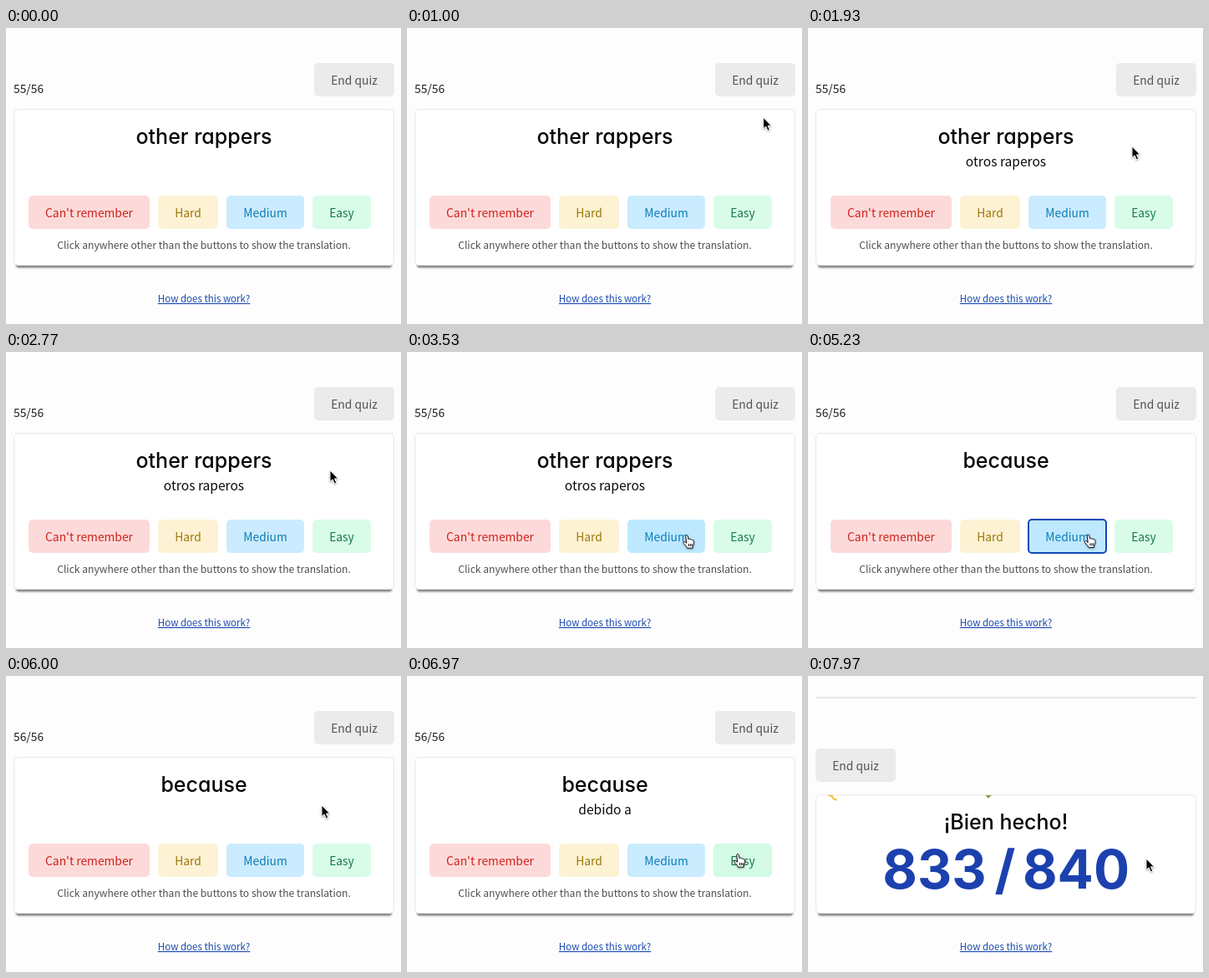
An HTML page that plays this animation: 473x355 px, repeating every 8000 ms.

```html
<!DOCTYPE html>
<html lang="en">
<head>
<meta charset="utf-8">
<title>Vocabulary quiz</title>
<style>
  html, body { margin: 0; width: 100%; height: 100%; overflow: hidden; background: #fdfdfd; }
  svg { display: block; width: 100%; height: 100%; }
  text {
    font-family: "Noto Sans CJK JP", "Noto Sans CJK SC", "Noto Sans CJK KR", "Noto Sans CJK", "Noto Sans", sans-serif;
    font-weight: 300;
    font-optical-sizing: none;
    white-space: pre;
  }
  .mid { text-anchor: middle; }
  .title { font: 500 25px Inter, sans-serif; font-feature-settings: "cv11"; fill: #060606; }
  .score { font: 700 64px Inter, sans-serif; fill: #1c41ae; }
  .body { font-size: calc(16px * var(--fit)); }
  .answer { font-size: calc(18px * var(--fit)); fill: #0a0a0a; }
  .hint { font-size: calc(14px * var(--fit)); fill: #4d4d4d; }
  .link { font-size: calc(13.33px * var(--fit)); fill: #1d4bb0; text-decoration: underline; }
  #cursor { filter: drop-shadow(0 1px 1px rgba(0, 0, 0, .35)); }
</style>
</head>
<body>
<svg viewBox="0 0 473 355" xmlns="http://www.w3.org/2000/svg">
  <defs>
    <filter id="soft" x="-5%" y="-200%" width="110%" height="500%"><feGaussianBlur stdDeviation="1.3"/></filter>
    <clipPath id="inside"><rect x="10" y="143" width="454" height="142" rx="5"/></clipPath>
  </defs>
  <rect width="473" height="355" fill="#fdfdfd"/>
  <rect id="rule" x="9" y="25" width="456" height="2" fill="#e6e6e6"/>
  <g id="end">
    <rect x="369" y="42" width="96" height="40" rx="5" fill="#ebebeb"/>
    <text class="body mid" x="417" y="68" fill="#525252">End quiz</text>
  </g>
  <rect x="12" y="282" width="450" height="5.5" rx="3" fill="#000" opacity=".5" filter="url(#soft)"/>
  <rect id="card" x="9.5" width="455" rx="5" fill="#fff" stroke="#e7e7e7"/>
  <g id="quiz">
    <text id="count" class="body" x="9" y="78" fill="#1c1c1c"></text>
    <text id="word" class="title mid" x="237" y="139"></text>
    <text id="answer" class="answer mid" x="237" y="166"></text>
    <g id="buttons"></g>
    <rect id="ring" x="264" y="201" width="93" height="40" rx="4" fill="none" stroke="#1249b5" stroke-width="2"/>
    <text class="hint mid" x="237" y="265">Click anywhere other than the buttons to show the translation.</text>
  </g>
  <g id="done">
    <g id="confetti" clip-path="url(#inside)"></g>
    <text class="title mid" x="237" y="184">¡Bien hecho!</text>
    <text class="score mid" x="151.5" y="255">833</text>
    <text class="score mid" x="236" y="255">/</text>
    <text class="score mid" x="321" y="255">840</text>
  </g>
  <text class="link mid" x="237" y="329">How does this work?</text>
  <g id="cursor">
    <path id="arrow" d="M0 0V13.6L3.1 10.8 5.4 16 7.8 15 5.5 9.9H9.7Z" fill="#000" stroke="#fff" stroke-width="1" stroke-linejoin="round"/>
    <path id="hand" d="M-1.3 .6C-1.1-.7 .9-.8 1.2 .6L2 4.6C2.7 3.8 4 4 4.3 5 5 4.3 6.3 4.6 6.5 5.6 7.4 5.1 8.5 5.6 8.6 6.8 8.8 9 8.5 10.8 7.3 12.8L7.2 15.2H.6C-.2 13-2.2 11.4-3.9 9.2-4.9 7.8-3.2 6.8-2 7.8L-.2 9.3ZM2.4 10V13M4.4 10V13M6.2 10V13" fill="#fff" stroke="#111" stroke-width="1" stroke-linejoin="round"/>
  </g>
</svg>
<script>
const LOOP = 8000;
const REVEAL = [1450, 6080];
const PRESS = 3800, NEXT = 3900, BLUR = 5900, DONE = 7250;

const $ = id => document.getElementById(id);
const show = (id, on) => $(id).setAttribute("display", on ? "inline" : "none");
const setText = (id, s) => { if ($(id).textContent !== s) $(id).textContent = s; };

function add(parent, tag, attrs, text = "") {
  const el = document.createElementNS("http://www.w3.org/2000/svg", tag);
  for (const k in attrs) el.setAttribute(k, attrs[k]);
  el.textContent = text;
  return parent.appendChild(el);
}

// Slightly smaller type when the light weight is not installed.
function fitType() {
  const ctx = document.createElement("canvas").getContext("2d");
  const width = weight => {
    ctx.font = weight + ' 100px "Noto Sans CJK JP", "Noto Sans", sans-serif';
    return ctx.measureText("remember").width;
  };
  const fit = Math.abs(width(300) - width(400)) > 1 ? 0.8955 : 0.865;
  document.documentElement.style.setProperty("--fit", fit);
}

const buttons = [
  { label: "Can't remember", x: 27, w: 145, bg: "#fddada", hover: "#fccccc", ink: "#cf2018" },
  { label: "Hard", x: 182, w: 72, bg: "#fdf2d3", hover: "#fcecc0", ink: "#9c760a" },
  { label: "Medium", x: 264, w: 93, bg: "#cbebff", hover: "#bee8ff", ink: "#087cb8" },
  { label: "Easy", x: 367, w: 70, bg: "#d9fce9", hover: "#d3fbe5", ink: "#157a42" }
];
for (const b of buttons) {
  b.rect = add($("buttons"), "rect", { x: b.x, y: 201, width: b.w, height: 40, rx: 5, fill: b.bg });
  add($("buttons"), "text", { class: "body mid", x: b.x + b.w / 2, y: 227, fill: b.ink }, b.label);
}

const bits = [
  { x: 30, born: 7780, color: "#f2c230", turn: 18, shape: "M-6-2Q-2-3 0-.5T6 0L5 3Q1 3.5-1 1.5T-6 1Z" },
  { x: 216, born: 7850, color: "#8b9c45", turn: 50, shape: "M-3.5-3.5H3.5V3.5H-3.5Z" }
];
for (const b of bits) b.el = add($("confetti"), "path", { d: b.shape, fill: b.color });

// Pointer stops: time, x, y
const stops = [
  [420, 446, 84], [800, 428, 106], [970, 428, 106], [1250, 388, 142],
  [2900, 388, 142], [3350, 335, 220], [5200, 335, 220], [5700, 378, 155],
  [6700, 378, 155], [6940, 396, 214], [7350, 396, 214], [7650, 405, 219]
];

function pointerAt(t) {
  const i = stops.findIndex(s => s[0] > t);
  if (i < 0) return stops[stops.length - 1].slice(1);
  if (i === 0) return stops[0].slice(1);
  const [t0, x0, y0] = stops[i - 1], [t1, x1, y1] = stops[i];
  const p = (t - t0) / (t1 - t0), e = p * p * (3 - 2 * p);
  return [x0 + (x1 - x0) * e, y0 + (y1 - y0) * e];
}

function draw(t) {
  const done = t >= DONE, second = t >= NEXT;
  const [px, py] = pointerAt(t), visible = t >= stops[0][0];

  show("quiz", !done);
  show("done", done);
  show("rule", done);
  $("end").setAttribute("transform", done ? "translate(-360 45)" : "");
  const top = done ? 142.5 : 97.5;
  $("card").setAttribute("y", top);
  $("card").setAttribute("height", 284.5 - top);

  setText("count", second ? "56/56" : "55/56");
  setText("word", second ? "because" : "other rappers");
  setText("answer", second ? "debido a" : "otros raperos");
  show("answer", t >= REVEAL[+second]);
  show("ring", t >= PRESS && t < BLUR);

  let over = false;
  for (const b of buttons) {
    const hit = visible && !done && px >= b.x && px <= b.x + b.w && py >= 201 && py <= 241;
    b.rect.setAttribute("fill", hit ? b.hover : b.bg);
    over = over || hit;
  }
  show("cursor", visible);
  show("hand", over);
  show("arrow", !over);
  $("cursor").setAttribute("transform", `translate(${px} ${py})`);

  for (const b of bits) {
    const age = Math.max(0, t - b.born) / 1000;
    const y = 137 + 32 * age + 60 * age * age;
    b.el.setAttribute("transform", `translate(${b.x} ${y}) rotate(${b.turn + 60 * (age - 0.15)})`);
  }
}

fitType();
const start = performance.now();
function tick() {
  draw((performance.now() - start) % LOOP);
  requestAnimationFrame(tick);
}
tick();
</script>
</body>
</html>
```
